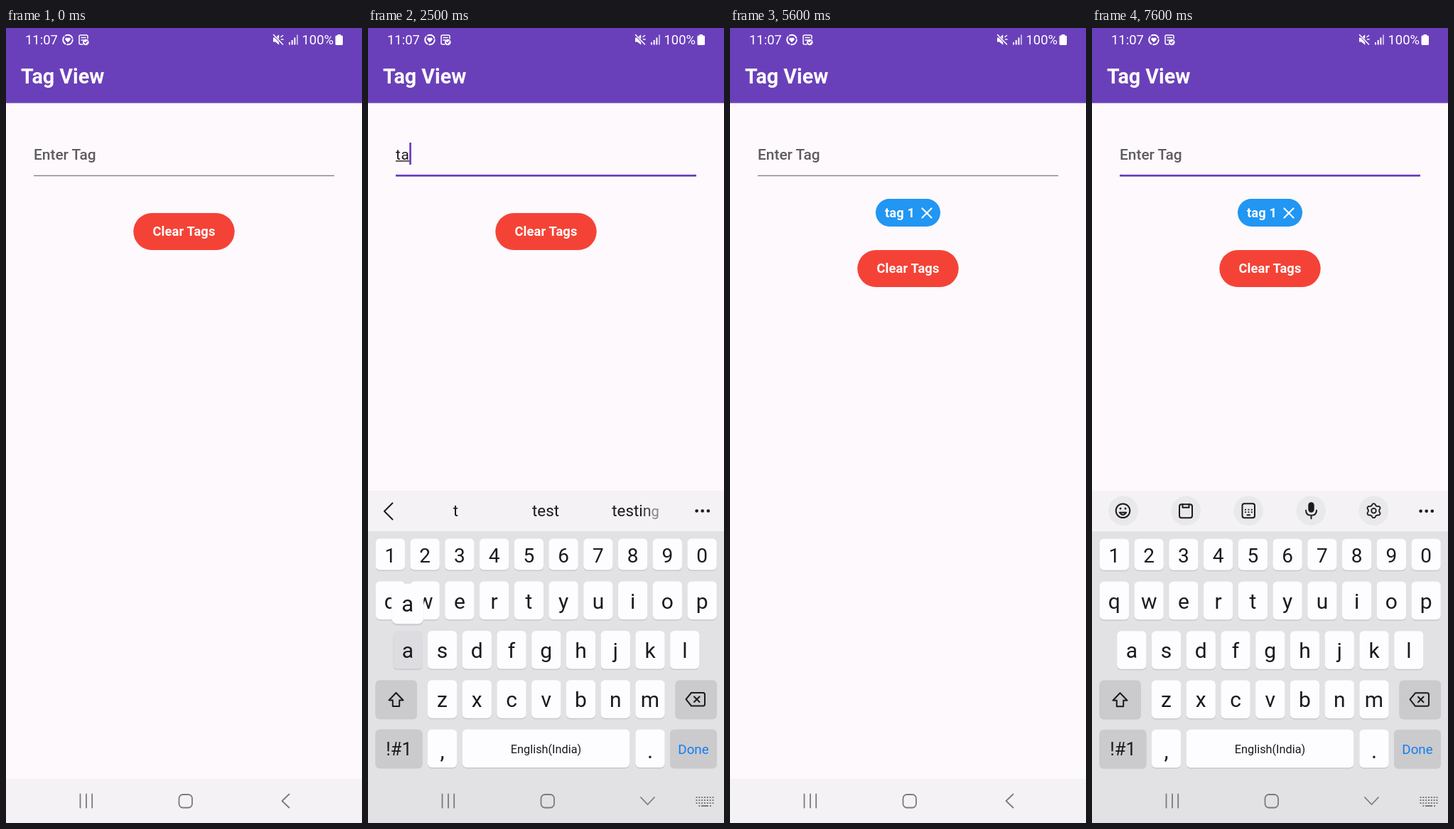
Write an HTML page that moves like this. It is 501 by 1117 pixels and loops after 8 s.

```html
<!DOCTYPE html>
<html lang="en">
<head>
<meta charset="utf-8">
<title>Tag View</title>
<style>
  html, body { margin: 0; width: 100%; height: 100%; overflow: hidden; background: #fef9fd; }
  svg { display: block; width: 501px; height: 1117px; font-family: Roboto, sans-serif; }
  .mid { text-anchor: middle; }
  .bold { font-weight: 700; }
  .line { fill: none; stroke-linecap: round; stroke-linejoin: round; }
</style>
</head>
<body>
<svg id="stage" viewBox="0 0 501 1117">
  <rect width="501" height="1117" fill="#fef9fd"/>

  <g id="header" fill="#fff">
    <rect width="501" height="105.5" fill="#6a40ba"/>
    <text x="21" y="78" font-size="28.7" class="bold">Tag View</text>
    <text x="27" y="22.5" font-size="18.4">11:07</text>
    <text x="416.5" y="22.5" font-size="18.4">100%</text>
    <circle cx="87" cy="16.5" r="6.8" class="line" stroke="#fff" stroke-width="1.9" stroke-dasharray="11.5 2.74" stroke-linecap="butt"/>
    <path d="M87 20.3l-3.4-3.5a2 2 0 0 1 3.4-2.4a2 2 0 0 1 3.4 2.4z"/>
    <g class="line" stroke="#fff" stroke-width="1.5">
      <path d="M108 23h-3q-2 0-2-2v-9q0-2 2-2h8q2 0 2 2v3M106 13.5h6M106 17h3"/>
    </g>
    <circle cx="112.3" cy="20" r="4.3"/>
    <path d="M110.3 20l1.5 1.5l2.6-2.9" class="line" stroke="#6a40ba" stroke-width="1.3"/>
    <path d="M376 13.5h3.2l5-4.2v14.4l-5-4.2h-3.2z"/>
    <path d="M376 9l13.5 14.5" class="line" stroke="#6a40ba" stroke-width="3"/>
    <path d="M376.5 9.5l13 13.5M387 12.5l2.5-2M387.5 16h2.5" class="line" stroke="#fff" stroke-width="1.6"/>
    <path d="M398 20h2v3.500h-2zM401.700 17h2v6.500h-2zM405.400 13.500h2v10h-2z"/>
    <path d="M409 9.500h2v14h-2z" opacity=".6"/>
    <path d="M466.500 9h4.500v1.500h1.500q1.500 0 1.500 1.500v10.500q0 1.500-1.500 1.500h-7.500q-1.500 0-1.500-1.500v-10.500q0-1.500 1.500-1.500h1.500z"/>
  </g>

  <g id="field">
    <text id="hint" x="39" y="184.800" font-size="20.900" font-weight="500" fill="#5e5b61">Enter Tag</text>
    <text id="typed" x="39" y="184.800" font-size="20.900" letter-spacing=".65" fill="#1d1b20" xml:space="preserve"></text>
    <rect id="composing" x="39" y="186.200" height="1.400" fill="#1d1b20"/>
    <rect x="39" y="206.800" width="423" height="1.400" fill="#858188"/>
    <rect id="focusLine" x="39" y="206" width="423" height="2.700" fill="#6a40ba"/>
    <rect id="cursor" y="161" width="2.700" height="31" fill="#6a40ba"/>
  </g>

  <g id="chip">
    <rect x="205" y="240" width="91" height="39" rx="19.500" fill="#2196f3"/>
    <text x="218" y="266" font-size="18.300" letter-spacing=".13" class="bold" fill="#fff">tag 1</text>
    <path d="M270.500 253.500l13 13m0-13l-13 13" class="line" stroke="#fff" stroke-width="2.200"/>
  </g>
  <g id="button">
    <rect x="179.300" y="260" width="142.400" height="52" rx="26" fill="#f44336"/>
    <text x="250.500" y="292.300" font-size="18.300" letter-spacing=".13" class="bold mid" fill="#fff">Clear Tags</text>
  </g>

  <rect y="1055" width="501" height="62" fill="#f4f2f5"/>

  <g id="keyboard">
    <rect y="650" width="501" height="57" fill="#f4f2f5"/>
    <rect y="707" width="501" height="420" fill="#e2e1e4"/>
    <g id="tools" class="line" stroke="#1b1a1d" stroke-width="2">
      <g id="discs" fill="#e9e8ea" stroke="none"></g>
      <circle cx="43.500" cy="678" r="9.800"/>
      <path d="M38.800 680.500q4.700 6.500 9.400 0z"/>
      <path d="M40 675v.1M47 675v.1" stroke-width="2.800"/>
      <rect x="123" y="669" width="18" height="19" rx="3"/>
      <path d="M127.500 669v4.500h9v-4.500"/>
      <rect x="211.500" y="668" width="17.500" height="20" rx="3"/>
      <path d="M216 676.500h9M216 680h9" stroke-width="2.200" stroke-dasharray=".1 4.300"/>
      <path d="M218.500 684h3.500"/>
      <rect x="304.300" y="666" width="8.400" height="14.500" rx="4.200" fill="#1b1a1d" stroke="none"/>
      <path d="M301 677.500q0 7 7.500 7t7.500-7M308.500 685v4"/>
      <path id="gear" stroke-width="1.800"/>
      <circle cx="396.500" cy="678" r="3.300" stroke-width="1.800"/>
    </g>
    <g id="suggestions">
      <path d="M34.500 667.500l-11.500 11.500l11.500 11.500" class="line" stroke="#1b1a1d" stroke-width="2"/>
      <g id="words" font-size="22.300" fill="#1b1a1d" class="mid"></g>
    </g>
    <g fill="#1b1a1d"><circle cx="462.600" cy="678.500" r="2.300"/><circle cx="470.700" cy="678.500" r="2.300"/><circle cx="478.800" cy="678.500" r="2.300"/></g>
    <g id="keys" fill="#1b1a1d" class="mid"></g>
    <path d="M39.500 934l10 10.500h-5.300v8.500h-9.400v-8.500h-5.300z" class="line" stroke="#1b1a1d" stroke-width="2"/>
    <path d="M455 934h16.500q2.500 0 2.500 2.500v13.500q0 2.500-2.500 2.500h-16.500l-7.500-9.300zM459 939.500l7.500 7.500m0-7.500l-7.500 7.500" class="line" stroke="#1b1a1d" stroke-width="2"/>
    <g id="popup">
      <rect width="45" height="57" rx="8" y="1.500" fill="#cfced2"/>
      <rect width="45" height="56" rx="8" fill="#fdfcfe"/>
      <text x="22.500" y="39" font-size="31" class="mid" fill="#1b1a1d"></text>
    </g>
  </g>

  <g class="line" stroke="#7c7a7f" stroke-width="1.800">
    <path d="M104.500 1076.500v19M113 1076.500v19M121.200 1076.500v19"/>
    <rect x="243.500" y="1077" width="18.500" height="18.500" rx="5.500"/>
    <path id="back" d="M5 -9.500l-10 9.500l10 9.500"/>
    <g id="switcher" stroke-width="1.900" stroke-linecap="butt">
      <path d="M461.500 1081h25M461.500 1085h25" stroke-dasharray="2 1.830"/>
      <path d="M461.500 1089h25" stroke-dasharray="2 1.830"/>
      <path d="M465.300 1093h2M469 1093h10M481 1093h2"/>
    </g>
  </g>
</svg>

<script>
const LOOP = 8000, STEP = 100, BAR_TOP = 650, TRAVEL = 1117 - BAR_TOP;
const $ = id => document.getElementById(id);
const clamp = v => Math.min(1, Math.max(0, v));
const ramp = (t, start, length) => clamp((t - start) / length);
const show = (el, on) => el.setAttribute("opacity", +on);
const lastAt = (list, t) => list.filter(item => item.at <= t).pop();

// Cubic Bezier (.4, 0, .2, 1), solved by bisection.
function ease(x) {
  let low = 0, high = 1;
  for (let i = 0; i < 24; i++) {
    const s = (low + high) / 2, r = 1 - s;
    if (1.2 * s * r * r + 0.6 * s * s * r + s ** 3 < x) low = s; else high = s;
  }
  return low * low * (3 - 2 * low);
}

const edits = [
  { at: 0, text: "" }, { at: 1150, text: "" }, { at: 2100, text: "t" }, { at: 2500, text: "ta" },
  { at: 3000, text: "tag" }, { at: 3700, text: "tag " }, { at: 4300, text: "tag 1" },
  { at: 5200, text: "" }, { at: 7100, text: "" }
];
const wordSets = [
  { at: 2270, words: ["t", "test", "testing"] },
  { at: 2670, words: ["ta", "take", "taking"] },
  { at: 3150, words: ["tag", "tagged", "tags"] },
  { at: 3680, words: ["and", "is", "along"] },
  { at: 4480, words: ["1", "1st", "10"] }
];
const presses = [
  { key: "t", from: 2000, to: 2100 }, { key: "a", from: 2400, to: 2600 },
  { key: "g", from: 2900, to: 3000 }, { key: "English(India)", from: 3600, to: 3700 },
  { key: "1", from: 4200, to: 4300 }, { key: "Done", from: 5100, to: 5200 }
];

const keys = {};
function addKey(label, x, y, w, h, size, baseline, gray, color = "#1b1a1d") {
  const fill = gray ? "#cbcacd" : "#fdfcfe";
  $("keys").insertAdjacentHTML("beforeend",
    `<g><rect x="${x}" y="${y + 1.5}" width="${w}" height="${h}" rx="6" fill="#c9c8cc"/>
     <rect x="${x}" y="${y}" width="${w}" height="${h}" rx="6" fill="${fill}"/>
     <text x="${x + w / 2}" y="${y + baseline}" font-size="${size}" fill="${color}">${label}</text></g>`);
  keys[label] = { x, y, fill, face: $("keys").lastElementChild.children[1] };
}
function addRow(letters, x, y, h, size, baseline) {
  [...letters].forEach((c, i) => addKey(c, x + i * 48.75, y, 41.2, h, size, baseline));
}
addRow("1234567890", 10.8, 717.5, 44, 28, 33);
addRow("qwertyuiop", 10.8, 777.5, 53.5, 30, 38);
addRow("asdfghjkl", 35.2, 847, 53.5, 30, 37.5);
addRow("zxcvbnm", 83.9, 916.2, 53.5, 30, 37.5);
addKey("", 10.5, 916.2, 58.5, 53.5, 30, 38, true);
addKey("", 432.5, 916.2, 58.5, 53.5, 30, 38, true);
addKey("!#1", 10.5, 985.5, 66, 53.5, 25.5, 36, true);
addKey(",", 83.9, 985.5, 41.2, 53.5, 31, 40);
addKey("English(India)", 132.8, 985.5, 235.4, 53.5, 16.3, 33);
addKey(".", 376.4, 985.5, 41.2, 53.5, 31, 40);
addKey("Done", 425, 985.5, 66, 53.5, 18.8, 34, true, "#127ff0");

for (let i = 0; i < 5; i++)
  $("discs").insertAdjacentHTML("beforeend", `<circle cx="${44 + i * 88.1}" cy="678" r="20.800"/>`);

const gearPoint = i => {
  const angle = i * Math.PI / 24, r = 8.8 + 1.1 * Math.tanh(3 * Math.cos(6 * angle));
  return `${396.5 + r * Math.sin(angle)} ${678 - r * Math.cos(angle)}`;
};
$("gear").setAttribute("d", "M" + Array.from({ length: 48 }, (_, i) => gearPoint(i)).join("L") + "Z");

function drawWords(t) {
  const set = lastAt(wordSets, t);
  $("words").innerHTML = !set ? "" : set.words.map((word, n) => {
    const letters = [...word].map((c, i) => {
      const p = ramp(t, set.at + i * 30, 100);
      return `<tspan fill-opacity="${p}" font-size="${22.3 * (0.8 + 0.2 * p)}">${c}</tspan>`;
    }).join("");
    return `<text x="${123.5 + n * 126.5}" y="686.300">${letters}</text>`;
  }).join("");
}

function drawField(t) {
  const edit = lastAt(edits, t), text = edit.text;
  const focused = (t >= 1100 && t < 5200) || t >= 7100;
  const focus = ramp(t, 1100, 167) - ramp(t, 5100, 167) + ramp(t, 7100, 167);
  $("typed").textContent = text;
  const width = text ? $("typed").getComputedTextLength() : 0;
  show($("hint"), !text);
  $("composing").setAttribute("width", t < 3700 ? width : 0);
  show($("focusLine"), focus);
  $("cursor").setAttribute("x", 38.7 + width);
  show($("cursor"), focused && (t < 1150 || Math.floor((t - edit.at) / 500) % 2 === 0));
}

function drawPress(t) {
  const press = presses.find(p => t >= p.from && t < p.to);
  for (const key of Object.values(keys)) key.face.setAttribute("fill", key.fill);
  const popped = press && press.key.length === 1;
  show($("popup"), !!popped);
  if (!press) return;
  const key = keys[press.key];
  if (press.key !== "1") key.face.setAttribute("fill", key.fill === "#cbcacd" ? "#bbbabd" : "#dddce0");
  if (popped) {
    $("popup").setAttribute("transform", `translate(${key.x - 2} ${key.y - 66})`);
    $("popup").lastElementChild.textContent = press.key;
  }
}

function draw(t) {
  const raised = ease(ramp(t, 686, 620)) - ease(ramp(t, 5150, 430)) + ease(ramp(t, 7000, 620));
  $("keyboard").setAttribute("transform", `translate(0 ${TRAVEL * (1 - raised)})`);
  show($("keyboard"), raised > 0);

  const turned = ramp(t, 686, 250) - ramp(t, 5150, 250) + ramp(t, 7000, 250);
  $("back").setAttribute("transform", `translate(393.500 1086) rotate(${-90 * turned})`);
  show($("switcher"), turned);

  const suggesting = t < 6000 ? ramp(t, 2050, 200) : 0;
  show($("tools"), 1 - suggesting);
  show($("suggestions"), suggesting);
  drawWords(t);
  drawField(t);
  drawPress(t);

  const tagged = t >= 5200;
  show($("chip"), tagged);
  $("button").setAttribute("transform", `translate(0 ${tagged ? 52 : 0})`);
}

const begin = performance.now();
function tick() {
  const elapsed = (performance.now() - begin) % LOOP;
  draw(Math.floor(elapsed / STEP) * STEP);
  requestAnimationFrame(tick);
}
tick();
</script>
</body>
</html>
```
